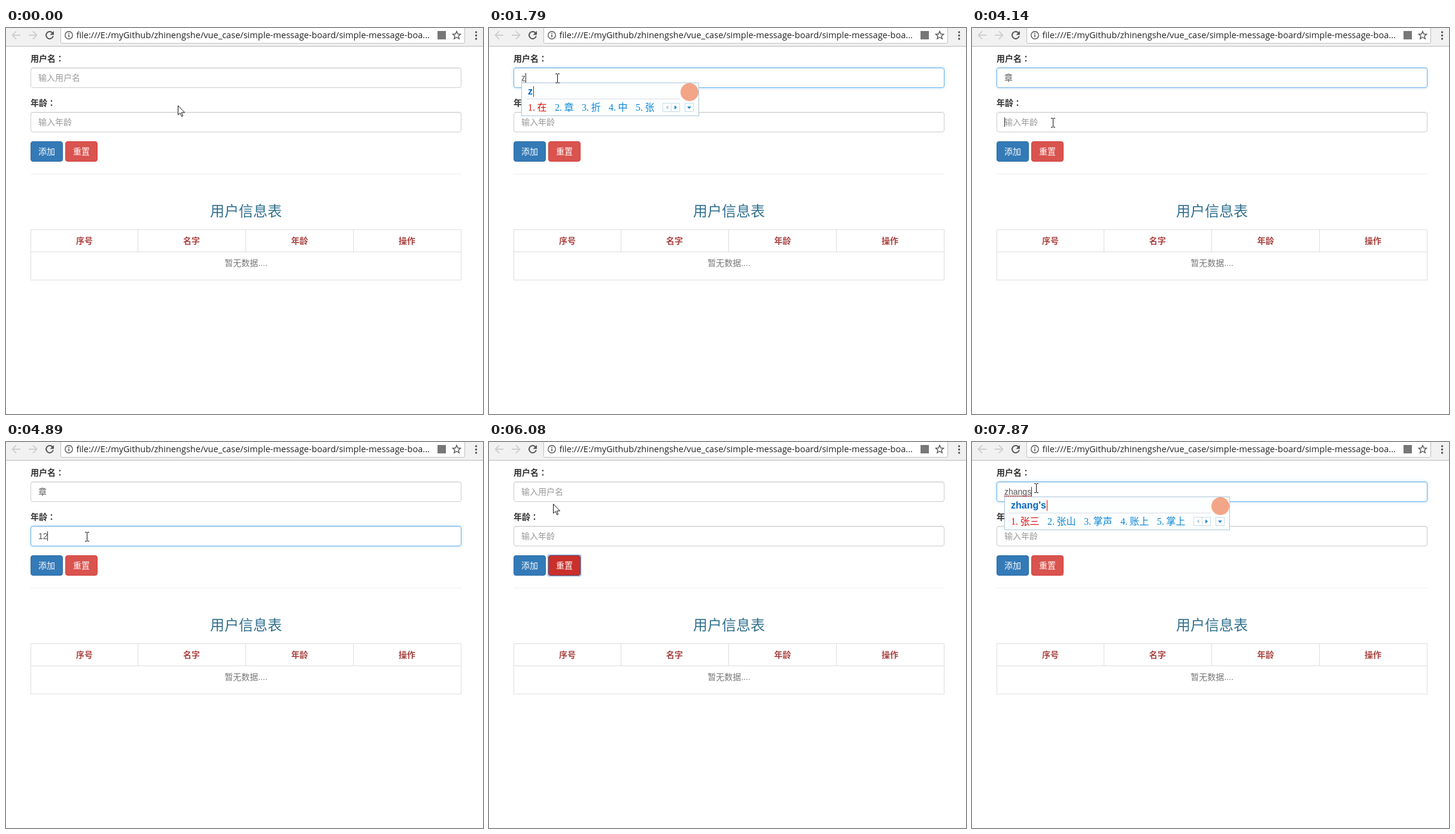
Animation of 797x644 px, one loop 8 s. Source, as an HTML page:

```html
<!DOCTYPE html>
<html lang="zh-CN">
<head>
<meta charset="utf-8">
<style>
html, body { margin: 0; width: 100%; height: 100%; overflow: hidden; background: #fff; }
svg { position: absolute; left: 0; top: 0; }
.field { position: absolute; left: 41px; width: 720px; height: 34px; box-sizing: border-box; border: 1px solid #ccc; border-radius: 4px; }
text { font-family: "Liberation Sans", "Noto Sans CJK SC", "Noto Sans CJK", sans-serif; font-size: 14px; white-space: pre; }
.mid { text-anchor: middle; }
.bold { font-weight: 700; }
.button { font-weight: 500; }
.colon { font-family: "Noto Sans CJK JP", "Noto Sans CJK", sans-serif; }
.url { font: 14.56px "Open Sans", "Noto Sans", sans-serif; }
.title { font-size: 24px; }
.typed { font: bold 16px "Liberation Sans", sans-serif; }
.num { font: 16px "Liberation Serif", serif; }
.word { font: 300 16px "Noto Sans CJK SC", "Noto Sans CJK", sans-serif; }
</style>
</head>
<body>
<div class="field" id="nameBox" style="top:66px"></div>
<div class="field" id="ageBox" style="top:140px"></div>
<svg width="797" height="644" viewBox="0 0 797 644">
  <!-- browser bar -->
  <path fill="#f1f1f1" d="M0 0H797V30H0Z"/>
  <path stroke="#b9b9b9" d="M0 30.5H797"/>
  <path fill="#fff" stroke="#bdbdbd" d="M91.5 -2V23.5Q91.5 25.5 93.5 25.5H764.5Q766.5 25.5 766.5 23.5V-2"/>
  <g fill="none" stroke="#cfcfcf" stroke-width="1.8">
    <path d="M24 12H11M17 5.5L10.5 12L17 18.5"/>
    <path d="M38 12H51M45 5.5L51.5 12L45 18.5"/>
  </g>
  <path fill="none" stroke="#555" stroke-width="2" d="M77.5 8A6 6 0 1 0 78.8 13.5"/>
  <path fill="#555" d="M80 5V11.5H73.5Z"/>
  <circle cx="105" cy="12" r="6.2" fill="none" stroke="#555" stroke-width="1.4"/>
  <path fill="#555" d="M104.2 8.3h1.6v1.6h-1.6zM104.2 11h1.6v4.5h-1.6z"/>
  <text class="url" x="117.5" y="17" fill="#222">file:///E:/myGithub/zhinengshe/vue_case/simple-message-board/simple-message-boa...</text>
  <rect x="721" y="5" width="14" height="14" fill="#777"/>
  <path fill="none" stroke="#555" stroke-width="1.4" d="M753 5.5L754.9 10L759.6 10.3L756 13.4L757.2 18L753 15.5L748.8 18L750 13.4L746.4 10.3L751.1 10Z"/>
  <g fill="#555"><circle cx="785.5" cy="7" r="1.7"/><circle cx="785.5" cy="12.5" r="1.7"/><circle cx="785.5" cy="18" r="1.7"/></g>

  <!-- form -->
  <g class="bold" fill="#333">
    <text x="41" y="56">用户名<tspan class="colon" lang="ja">：</tspan></text>
    <text x="41" y="130">年龄<tspan class="colon" lang="ja">：</tspan></text>
  </g>
  <text id="nameText" x="54" y="88"></text>
  <text id="ageText" x="54" y="162"></text>
  <path id="spelling" stroke="#e33" stroke-dasharray="2 1"/>
  <path id="underline" stroke="#555" stroke-dasharray="1 1"/>
  <path id="caret" stroke="#333"/>
  <rect x="41.5" y="189.5" width="53" height="33" rx="3.5" fill="#337ab7" stroke="#2e6da4"/>
  <rect id="reset" x="99.5" y="189.5" width="53" height="33" rx="3.5"/>
  <rect id="ring" x="98.5" y="188.5" width="55" height="35" rx="2" fill="none" stroke="#8fa9dd" stroke-width="1.5"/>
  <g class="mid button" fill="#fff"><text x="68" y="211">添加</text><text x="126" y="211">重置</text></g>
  <path stroke="#eee" d="M41 243.5H761"/>

  <!-- table -->
  <text class="title mid" x="401" y="314" fill="#31708f">用户信息表</text>
  <path fill="none" stroke="#ddd" d="M41.5 336.5H760.5V420.5H41.5ZM41 373.5H761M220.5 336V373M400.5 336V373M580.5 336V373"/>
  <g class="mid bold" fill="#a94442">
    <text x="131" y="360">序号</text><text x="310" y="360">名字</text>
    <text x="490.5" y="360">年龄</text><text x="670" y="360">操作</text>
  </g>
  <text class="mid" x="401" y="397" fill="#777">暂无数据....</text>

  <!-- input method window -->
  <g id="popup">
    <rect id="panel" x="54.5" y="91.5" height="55" fill="#fdfefe" stroke="#aac4d8"/>
    <path id="divider" stroke="#d5dfe6"/>
    <text id="typed" class="typed" x="65" y="111" fill="#0a6ac0"></text>
    <path id="typedCaret" stroke="#e00"/>
    <g id="words"></g>
    <g id="controls">
      <circle cx="-16" cy="107" r="15" fill="#f3a587"/>
      <path fill="#fff" stroke="#c3dcec" d="M-60.5 125.5h14v14h-14zM-46.5 125.5h14v14h-14zM-23.5 125.5h14v14h-14z"/>
      <path fill="#b5cbd8" d="M-51.5 129v7l-4-3.5z"/>
      <path fill="#1787d4" d="M-41 129v7l4-3.5zM-20 131h7l-3.5 4z"/>
    </g>
  </g>

  <!-- pointers -->
  <path id="arrow" fill="#fff" stroke="#111" d="M.5 .5V16L4 12.7L6.6 18.5L8.7 17.6L6.2 12H11.5Z"/>
  <path id="beam" fill="none" stroke="#111" d="M-3 -7.5H0M1 -7.5H4M.5 -7V7M-3 7.5H0M1 7.5H4"/>
  <path id="hand" fill="#fff" stroke="#111" d="M-1.5 13V1.5Q0 -.5 1.5 1.5V7Q3.2 5.5 4.5 7.5Q6.2 6.3 7.5 8.3Q10.5 7.5 10.5 10.5V15Q10.5 17 8.5 19V21.5H-.5V19L-5.5 12.5Q-5.5 10 -3.5 11Z"/>
</svg>
<script>
const LOOP = 8000;
const $ = id => document.getElementById(id);
const set = (id, attrs) => { for (const k in attrs) $(id).setAttribute(k, attrs[k]); };
const show = (id, on) => set(id, { visibility: on ? "visible" : "hidden" });
const within = (t, a, b) => t >= a && t < b;
const mix = (a, b, p) => a + (b - a) * p;
const ease = (t, start) => {
  const p = Math.min(1, Math.max(0, (t - start + 20) / 160));
  return p * p * (3 - 2 * p);
};

// start, end, steps, x, y
const moves = [
  [380, 780, 7, 114, 84], [3590, 3640, 2, 133, 116], [3820, 3960, 3, 135, 158],
  [5140, 5420, 5, 118, 214], [5830, 6080, 4, 107, 103], [6150, 6290, 3, 107, 77]
];

// time, letters, candidates, label
const typing = [
  [1790, "z", "在 章 折 中 张"], [1920, "zh", "这 中 章 张 折"], [2100, "zha", "炸 扎 查 渣 闸"],
  [2170, "zhan", "站 占 展 战 沾"], [2350, "zhang", "张 章 长 掌 涨"], [2850, ""],
  [7030, "z", "在 章 折 中 张"], [7210, "zh", "这 中 章 张 折"], [7300, "zha", "炸 扎 查 渣 闸"],
  [7450, "zhan", "站 占 展 战 沾"], [7600, "zhang", "张 章 长 掌 涨"],
  [7870, "zhangs", "张三 张山 掌声 账上 掌上", "zhang's"]
];

function pointer(t) {
  let x = 287, y = 129;
  for (const [start, end, steps, toX, toY] of moves) {
    if (t < start) break;
    const step = Math.floor((t - start) / (end - start) * (steps - 1) + 1e-6) + 1;
    const p = Math.min(1, step / steps);
    x = mix(x, toX, p);
    y = mix(y, toY, p);
  }
  return [Math.round(x), Math.round(y)];
}

function drawField(id, focus) {
  const c = [102, 175, 233].map(v => Math.round(mix(204, v, focus)));
  $(id).style.borderColor = `rgb(${c})`;
  $(id).style.boxShadow = `inset 0 1px 1px rgba(0,0,0,.075), 0 0 ${5 * focus}px rgba(102,175,233,${.45 * focus})`;
}

function drawValue(id, value, hint) {
  $(id).textContent = value || hint;
  set(id, { fill: value ? "#555" : "#999" });
  return value ? Math.floor(54 + $(id).getComputedTextLength()) + .5 : 54.5;
}

function drawPopup(letters, candidates, label) {
  show("popup", letters);
  if (!letters) return;
  const list = candidates.split(" ");
  const gap = 29 + 16 * list[0].length;
  const right = 126 + 5 * gap;
  set("panel", { width: right - 55 });
  set("divider", { d: `M62 118.5H${right - 32}` });
  set("controls", { transform: `translate(${right})` });
  $("typed").textContent = label || letters;
  const end = Math.round(66 + $("typed").getComputedTextLength()) + .5;
  set("typedCaret", { d: `M${end} 97V115` });
  $("words").innerHTML = list.map((word, i) => {
    const x = 65 + gap * i;
    return `<g fill="${i ? "#0b87d6" : "#e01010"}"><text class="num" x="${x}" y="138">${i + 1}.</text>` +
      `<text class="word" x="${x + 15.5}" y="138">${word}</text></g>`;
  }).join("");
}

function drawPointer(t) {
  const [x, y] = pointer(t);
  const overField = within(y, 66, 100) || within(y, 140, 174);
  const overReset = within(y, 189, 223) && within(x, 99, 153);
  const kind = overField ? "beam" : overReset ? "hand" : "arrow";
  for (const id of ["arrow", "beam", "hand"]) show(id, id === kind);
  set(kind, { transform: `translate(${x} ${y})` });
  return overReset;
}

function render(t) {
  const [, letters, candidates, label] = typing.filter(k => k[0] <= t).pop() || [0, ""];
  const name = letters || (within(t, 2850, 5600) ? "章" : "");
  const age = within(t, 4460, 5600) ? (t < 4890 ? "1" : "12") : "";

  drawField("nameBox", ease(t, 980) - ease(t, 4140) + ease(t, 6410));
  drawField("ageBox", ease(t, 4140) - ease(t, 5500));
  const nameEnd = drawValue("nameText", name, "输入用户名");
  const ageEnd = drawValue("ageText", age, "输入年龄");

  const inAge = within(t, 4140, 5500);
  const caretOn = within(t, 980, 1470) || within(t, 1790, 3390) || within(t, 3890, 5390) ||
    within(t, 6410, 6900) || t >= 7030;
  show("caret", caretOn);
  set("caret", { d: inAge ? `M${ageEnd} 149V165` : `M${nameEnd} 75V91` });
  show("underline", letters);
  set("underline", { d: `M54 89.5H${nameEnd}` });
  show("spelling", letters.length > 1);
  set("spelling", { d: `M54 90.5H${nameEnd}` });
  drawPopup(letters, candidates, label);

  const hover = drawPointer(t);
  const focused = within(t, 5500, 6410);
  const pressed = within(t, 5500, 5600);
  set("reset", {
    fill: pressed ? "#ac2925" : hover || focused ? "#c9302c" : "#d9534f",
    stroke: focused ? "#761c19" : hover ? "#ac2925" : "#d43f3a"
  });
  show("ring", focused);
}

const begin = performance.now();
function tick() {
  render((performance.now() - begin) % LOOP);
  requestAnimationFrame(tick);
}
tick();
</script>
</body>
</html>
```
